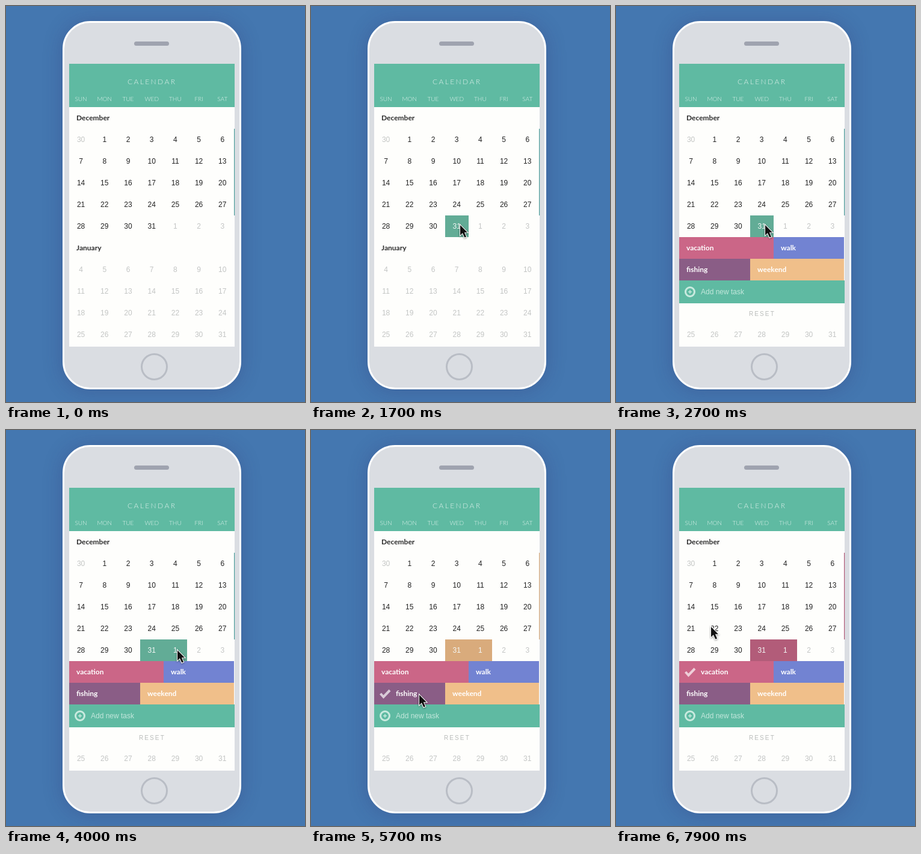
An HTML page that plays this animation: 497 px wide and 658 px high, repeating every 8000 ms.

```html
<!DOCTYPE html>
<html lang="en">
<head>
<meta charset="utf-8">
<title>Calendar</title>
<style>
  html, body { margin: 0; width: 100%; height: 100%; overflow: hidden; background: #4477b0; }
  .stage { position: relative; width: 497px; height: 658px; overflow: hidden; }
  .phone {
    position: absolute; left: 94px; top: 25px; width: 297px; height: 612px;
    box-sizing: border-box; border: 3px solid #fff; border-radius: 46px;
    background: #dadde2; box-shadow: 0 2px 32px rgba(50, 50, 110, .3);
  }
  svg { position: absolute; left: 0; top: 0; display: block; }
  text { font: 12px "Liberation Sans", Arial, sans-serif; }
  .lato { font-family: Lato, sans-serif; }
  .bold { font-weight: 700; }
  .thin { font-weight: 300; fill: #e2f3ee; }
</style>
</head>
<body>
<div class="stage">
  <div class="phone"></div>
  <svg id="art" width="497" height="658" viewBox="0 0 497 658"></svg>
</div>
<script>
const LOOP = 8000, STEP = 100;
const GREEN = '#5fbaa2';
const art = document.getElementById('art');

function add(tag, attrs, parent = art) {
  const el = document.createElementNS('http://www.w3.org/2000/svg', tag);
  for (const k in attrs) el.setAttribute(k, attrs[k]);
  parent.appendChild(el);
  return el;
}
const rect = (x, y, width, height, fill, parent) => add('rect', { x, y, width, height, fill }, parent);
function label(str, x, y, attrs, parent) {
  const el = add('text', { x, y, ...attrs }, parent);
  el.textContent = str;
  return el;
}
const show = (el, on) => el.setAttribute('opacity', +on);
const clamp = p => Math.max(0, Math.min(1, p));
const inOut = p => p < .5 ? 2 * p * p : 1 - 2 * (1 - p) * (1 - p);
const out = p => 1 - Math.pow(1 - p, 1.5);

// Phone and header
add('rect', { x: 213, y: 59, width: 58, height: 7, rx: 3.5, fill: '#9fa3af' });
add('circle', { cx: 246.5, cy: 599.5, r: 21, fill: 'none', stroke: '#b9bdc5', 'stroke-width': 3 });
rect(105, 96, 275, 470, '#fefefc');
rect(105, 96, 275, 72, GREEN);
label('CALENDAR', 202, 130, { class: 'lato thin', style: 'letter-spacing:2.4px' });

const colX = c => 124.6 + 39.2 * c;
'SUN MON TUE WED THU FRI SAT'.split(' ').forEach((d, c) =>
  label(d, colX(c), 158, { class: 'lato thin', 'text-anchor': 'middle', style: 'font-size:10px' }));

// Selected cells and the day grid
const cells = [rect(223, 348, 39, 36, '#62ac96'), rect(262, 348, 39, 36, '#62ac96')];
const wipe = rect(223, 348, 0, 36, '#62ac96');

const days = [];
for (let i = 0; i < 63; i++) {
  const row = Math.floor(i / 7);
  const n = i === 0 ? 30 : i > 31 ? i - 31 : i;
  days.push(label(n, colX(i % 7), 226 + 36 * (row + (row > 4)), {
    'text-anchor': 'middle', fill: i === 0 || i > 31 ? '#c3c5c4' : '#222'
  }));
}
label('December', 117, 190, { class: 'lato bold', fill: '#2b2b2b' });
label('January', 117, 406, { class: 'lato bold', fill: '#2b2b2b' });
const edge = rect(379, 204, 1.2, 144, '#4f9f9d');

// Task panel
const blank = rect(105, 494, 274, 36, '#fefefc');
const bars = [];
function bar(x, y, w, h, fill, start, end) {
  bars.push({ el: rect(x, y, 0, h, fill), w, start, end });
}
const tasks = [
  { name: 'vacation', x: 105, y: 384, w: 157.5, fill: '#cb6687', cell: '#b25c79', on: 6300, off: LOOP },
  { name: 'walk', x: 262, y: 384, w: 117, fill: '#7283d2', cell: '#6674c0', on: 4400, off: 4760 },
  { name: 'fishing', x: 105, y: 420, w: 118, fill: '#8a5d86', cell: '#7d577a', on: 5700, off: 6300 },
  { name: 'weekend', x: 223, y: 420, w: 156, fill: '#f0bf8a', cell: '#d9ab7c', on: 4760, off: 5700 }
];
for (const k of tasks) {
  const late = k.x > 105;
  bar(k.x, k.y, k.w, 36, k.fill, late ? 2100 : 2000, late ? 2500 : 2550);
}
bar(105, 456, 275, 38, GREEN, 2000, 2550);

const copy = add('g', {});
for (const k of tasks) {
  k.text = label(k.name, k.x + 12, k.y + 22, { class: 'lato bold', fill: '#fff' }, copy);
  k.tick = add('path', {
    d: `M${k.x + 10.5} ${k.y + 18}l5 5.5 10.5-11`,
    fill: 'none', stroke: '#fff', 'stroke-opacity': .68, 'stroke-width': 4
  }, copy);
}
add('circle', { cx: 123, cy: 475, r: 7.5, fill: 'none', stroke: '#c9eadf', 'stroke-width': 3 }, copy);
add('path', { d: 'M120 475h6M123 472v6', stroke: '#c9eadf', 'stroke-width': 1.5 }, copy);
label('Add new task', 141, 479, { fill: '#c3e7dc' }, copy);
label('RESET', 221, 515, { fill: '#b9bcba', style: 'font-size:10px;letter-spacing:2.1px' }, copy);

// Pointers
const arrow = add('g', { style: 'filter:drop-shadow(0 1px 1.5px rgba(0,0,0,.4))' });
add('path', {
  d: 'M0 0V17l3.9-3.7 3.3 7.3 2.9-1.2-3.2-7.1H12Z',
  fill: '#111', stroke: '#fff', 'stroke-width': 2, 'paint-order': 'stroke'
}, arrow);
const beam = add('g', {});
for (const [stroke, w] of [['#fff', 3.4], ['#111', 1.5]])
  add('path', {
    d: 'M-3-7.5Q0-7.5 0-5.5Q0-7.5 3-7.5M0-6V6M-3 7.5Q0 7.5 0 5.5Q0 7.5 3 7.5M-2 2.5H2',
    fill: 'none', stroke, 'stroke-width': w
  }, beam);

// time, x, y
const path = [
  [300, 193, 94], [400, 206, 145], [600, 268, 345], [700, 276, 364],
  [1000, 276, 364], [1100, 268, 347], [1300, 255, 354], [1500, 248, 364],
  [3000, 248, 364], [3400, 320, 422], [3700, 320, 422], [4000, 285, 366],
  [4200, 282, 362], [4300, 282, 362], [4400, 300, 402], [4600, 300, 402],
  [4800, 304, 441], [5300, 304, 441], [5700, 180, 440], [5900, 180, 440],
  [6200, 165, 405], [6300, 166, 410], [6400, 179, 478], [6600, 181, 480],
  [6800, 181, 480], [7100, 189, 540], [7300, 189, 540], [7700, 157, 327],
  [7800, 157, 327], [7900, 158, 327]
];
function pointAt(t) {
  const i = path.findIndex(p => p[0] > t);
  if (i < 0) return path[path.length - 1].slice(1);
  const a = path[i - 1], b = path[i], p = (t - a[0]) / (b[0] - a[0]);
  return [a[1] + (b[1] - a[1]) * p, a[2] + (b[2] - a[2]) * p];
}

const picks = tasks.slice().sort((a, b) => a.on - b.on);

function draw(t) {
  // selection
  const has = [t >= 1400, (t >= 600 && t < 1400) || t >= 4000];
  let base = '#62ac96', line = '#4f9f9d', width = 0;
  for (const k of picks) {
    const p = inOut(clamp((t - k.on - 100) / 300));
    if (p === 1) { base = line = k.cell; width = 0; }
    else if (p > 0) {
      width = 78 * p;
      wipe.setAttribute('fill', k.cell);
      if (p > .5) line = k.cell;
    }
  }
  cells.forEach((c, i) => { show(c, has[i]); c.setAttribute('fill', base); });
  wipe.setAttribute('width', width);
  edge.setAttribute('fill', line);
  days[31].setAttribute('fill', has[0] ? '#f4f8f6' : '#222');
  days[32].setAttribute('fill', has[1] ? '#f4f8f6' : '#c3c5c4');

  // panel
  for (const b of bars)
    b.el.setAttribute('width', b.w * out(clamp((t - b.start + 0.001 * (b.end - b.start)) / (b.end - b.start))) * (t > b.start));
  show(blank, t >= 2400);
  copy.setAttribute('opacity', clamp((t - 2500) / 200));
  for (const k of tasks) {
    const on = t >= k.on && t < k.off;
    k.text.setAttribute('x', k.x + (on ? 36 : 12));
    show(k.tick, on);
  }

  // pointer
  const typing = t >= 6400 && t < 6900;
  show(arrow, t >= 300 && !typing);
  show(beam, typing);
  if (t >= 300) {
    const [x, y] = pointAt(t);
    (typing ? beam : arrow).setAttribute('transform', `translate(${x} ${y})`);
  }
}

const began = performance.now();
function tick() {
  const t = (performance.now() - began) % LOOP;
  draw(Math.floor(t / STEP) * STEP);
  requestAnimationFrame(tick);
}
tick();
</script>
</body>
</html>
```
